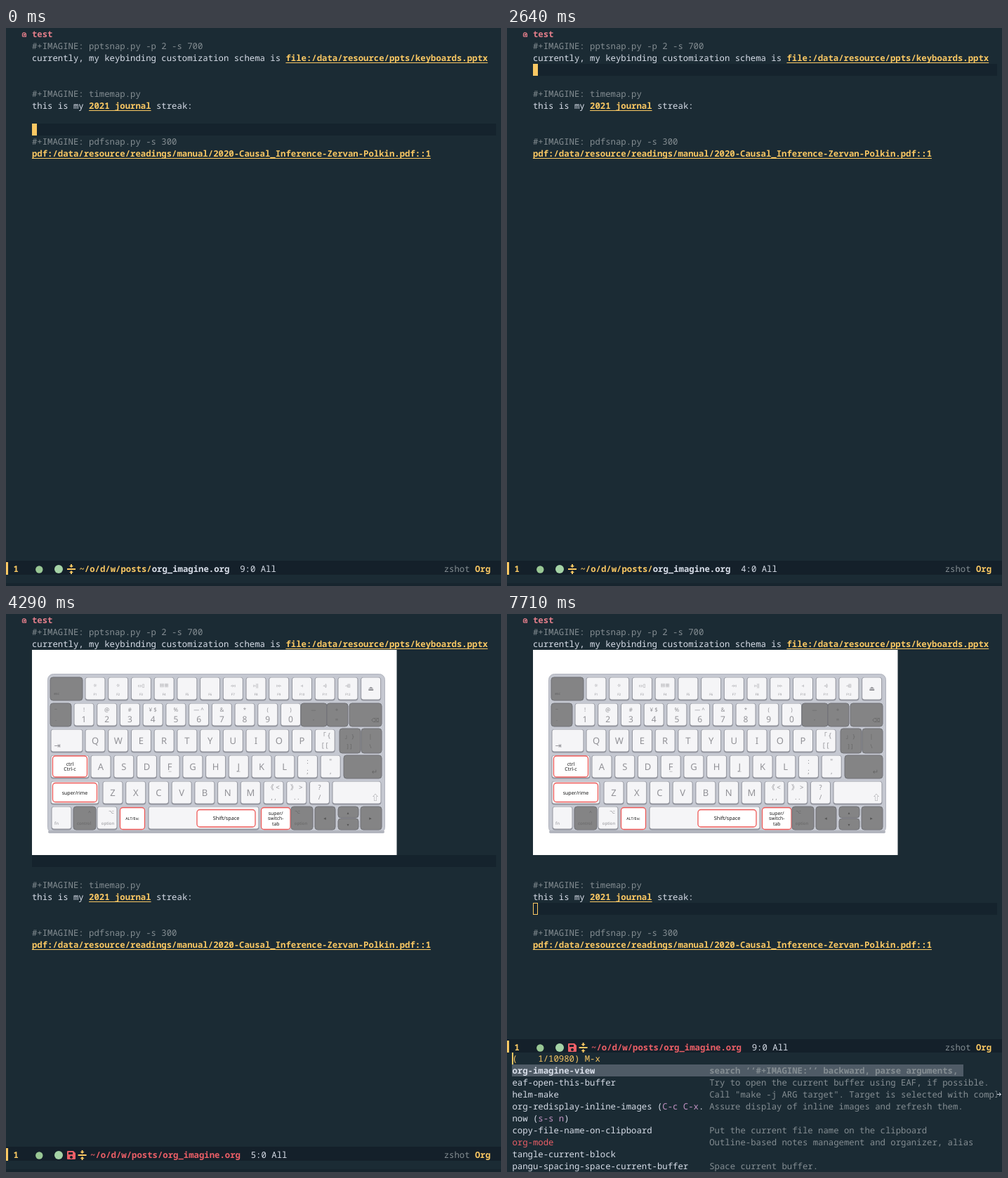
Animation of 705x794 px, one loop 8000 ms. Source, as an HTML page:

```html
<!DOCTYPE html>
<html lang="en">
<head>
<meta charset="utf-8">
<title>Org inline image demo</title>
<style>
  html, body { margin: 0; width: 100%; height: 100%; overflow: hidden; background: #1b2b34; }
  #stage {
    position: relative; width: 705px; height: 794px; overflow: hidden; background: #1b2b34; color: #d8dee9;
    font: 12.313px/17px "Noto Sans Mono", "DejaVu Sans Mono", monospace;
    font-variant-ligatures: none; text-rendering: geometricPrecision;
  }
  #stage > *, #modeline > *, #minibuffer > * { position: absolute; }
  .line, .cell { white-space: pre; height: 17px; }
  .line { left: 36.9px; }
  .current { left: 37px; width: 661px; height: 17px; background: #15232d; }
  .cursor { left: 37px; width: 7px; height: 17px; box-sizing: border-box; color: #1b2b34; white-space: pre; }
  .block { background: #fac863; }
  .hollow { border: 1px solid #fac863; }
  b { font-weight: 700; }
  .dim { color: #848d92; }
  .yellow { color: #fac863; }
  .red { color: #ec5f67; }
  .pink { color: #e27e8a; }
  .violet { color: #c594c5; }
  .link {
    color: #fac863; font-weight: 700; text-decoration: underline 1px;
    text-underline-offset: 1.5px; text-decoration-skip-ink: none;
  }
  #modeline { left: 0; width: 705px; height: 20px; background: #14202a; }
  #modeline .cell { top: 3px; }
  #modeline svg { left: 0; top: 0; }
  #minibuffer { left: 0; top: 624px; width: 705px; height: 170px; background: #1b2b34; }
  #minibuffer .cell { overflow: hidden; }
  .selected { left: 7px; top: 17px; width: 643px; height: 17px; background: #4f5b66; }
  .bar { left: 7px; top: 0; width: 2px; height: 17px; background: #fac863; }
  .arrow { left: 0; top: 0; }
  .bottom { left: 0; top: 790px; width: 705px; height: 4px; background: #17252e; }
  .bullet, .picture { left: 0; top: 0; }
</style>
</head>
<body>
<div id="stage"></div>
<script>
const LOOP = 8000, ROW = 17, CHAR = 7.388;
const PICTURE = { x: 37, y: 51, w: 519.5, h: 292 };

// start time, cursor line, cursor look, picture shown, command list open
const steps = [
  [0, 9, 'block', 0, 0], [1000, 8, 'block', 0, 0], [1150, 7, 'block', 0, 0],
  [1540, 6, 'block', 0, 0], [1730, 5, 'block', 0, 0], [1960, 4, 'block', 0, 0],
  [2350, 5, 'block', 0, 0], [2640, 4, 'block', 0, 0], [2960, 4, 'hollow', 0, 1],
  [4290, 5, '', 1, 0], [6480, 6, 'block', 1, 0], [6650, 7, 'block', 1, 0],
  [6810, 8, 'block', 1, 0], [6970, 9, 'block', 1, 0], [7710, 9, 'hollow', 1, 1]
];

const span = (cls, text) => `<span class="${cls}">${text}</span>`;
const imagine = args => span('dim', '#+IMAGINE: ' + args);

const intro = [
  '<b class="pink">test</b>',
  imagine('pptsnap.py -p 2 -s 700'),
  'currently, my keybinding customization schema is ' + span('link', 'file:/data/resource/ppts/keyboards.pptx')
];
const rest = [
  '', '',
  imagine('timemap.py'),
  `this is my ${span('link', '2021 journal')} streak:`,
  '', '',
  imagine('pdfsnap.py -s 300'),
  span('link', 'pdf:/data/resource/readings/manual/2020-Causal_Inference-Zervan-Polkin.pdf::1')
];

const commands = [
  ['<b>org-imagine-view</b>', '<b>search ‘‘#+IMAGINE:’’ backward, parse arguments,</b>'],
  ['eaf-open-this-buffer', 'Try to open the current buffer using EAF, if possible.'],
  ['helm-make', 'Call "make -j ARG target". Target is selected with compl'],
  [`org-redisplay-inline-images (${span('violet', 'C-c C-x')}.`, 'Assure display of inline images and refresh them.'],
  [`now (${span('violet', 's-s n')})`, ''],
  ['copy-file-name-on-clipboard', 'Put the current file name on the clipboard'],
  [span('red', 'org-mode'), 'Outline-based notes management and organizer, alias'],
  ['tangle-current-block', ''],
  ['pangu-spacing-space-current-buffer', 'Space current buffer.']
];

function cell(x, y, html, cls = '') {
  return `<div class="cell ${cls}" style="left:${x}px;top:${y}px;max-width:${698 - x}px">${html}</div>`;
}

function keyboard() {
  const GREY = '#929297', PITCH = 32.72;
  const rows = [90, 127, 164, 201, 238, 274];
  let out = '';
  const rect = (x, y, w, h, r, attrs) =>
    out += `<rect x="${x}" y="${y}" width="${w}" height="${h}" rx="${r}" ${attrs}/>`;
  const text = (x, y, s, size, fill = GREY) =>
    out += `<text x="${x}" y="${y}" font-size="${size}" fill="${fill}">${s.replace('<', '&lt;')}</text>`;
  const key = (x, right, row, h = 32) => {
    rect(x - .5, rows[row], right - x + 1, h + 1.5, 4, 'fill="#92949d"');
    rect(x + .5, rows[row] + .5, right - x - 1, h - 1, 3, 'fill="#f5f5f7"');
  };
  const dark = (x, right, row, y = rows[row], h = 33) =>
    rect(x, y, right - x, h, 4, 'fill="#848485" stroke="#707176"');
  const special = (x, y, w, h, lines, size) => {
    rect(x, y, w, h, 4, 'fill="#fff" stroke="#ee5a58" stroke-width="1.3"');
    lines.forEach((s, i) =>
      text(x + w / 2, y + h / 2 + size * .36 + (i - (lines.length - 1) / 2) * 7.7, s, size, '#161616'));
  };
  const run = (center, row, labels, draw) => labels.forEach((s, i) => {
    const x = center + i * PITCH;
    key(x - 14, x + 14, row);
    draw(x, s, i);
  });
  const letter = row => (x, s) => {
    if (s.length === 1) return text(x, rows[row] + 20.5, s, 13);
    text(x, rows[row] + 12, s.slice(0, s.length / 2), 9.5);
    text(x, rows[row] + 26, s.slice(s.length / 2), 9.5);
  };

  rect(PICTURE.x, PICTURE.y, PICTURE.w, PICTURE.h, 0, 'fill="#fff"');
  rect(59.5, 85.5, 480, 226, 8, 'fill="#c5c8d1" stroke="#b0b3bd"');
  rect(60, 308, 479, 4, 3, 'fill="#b2b5be"');

  dark(63, 109, 0);
  text(72, 115, 'esc', 5, '#5f5f60');
  run(127, 0, ['☼', '☼', '▭▯', '▦▦', '', '', '◃◃', '▹‖', '▹▹', '◃', '◃)', '◃))', '⏏'], (x, s, i) => {
    text(x, i < 12 ? 104 : 109, s, i < 12 ? 6.5 : 9);
    if (i < 12) text(x, 116, 'F' + (i + 1), 4.5);
  });

  dark(63, 93, 1);
  text(71, 138, '~', 7, '#666');
  text(71, 154, '·', 7, '#666');
  run(111, 1, ['!', '@', '#', '¥ $', '%', '— ^', '&amp;', '*', '(', ')'], (x, s, i) => {
    text(x, 139, s, 8);
    text(x, 154, String((i + 1) % 10), 12);
  });
  dark(420, 457, 1); dark(457, 487, 1); dark(489, 535, 1);
  text(438, 139, '—', 7, '#666'); text(438, 153, '-', 8, '#666');
  text(471, 139, '+', 8, '#666'); text(471, 153, '=', 8, '#666');
  text(526, 154, '⌫', 8, '#666');

  key(64, 109, 2);
  text(73, 191, '⇥', 11);
  run(127, 2, [...'QWERTYUIOP', '「 {[ ['], letter(2));
  dark(475, 505, 2, 163, 35); dark(506, 535, 2, 163, 35);
  text(489, 177, '」 }', 8, '#666'); text(489, 191, '] ]', 8, '#666');
  text(519, 177, '|', 8, '#666'); text(519, 191, '\\', 8, '#666');

  key(64, 118, 3);
  special(66.5, 202, 49, 30, ['ctrl', 'Ctrl-c'], 7);
  run(135, 3, [...'ASDFGHJKL', ':;', '",'], letter(3));
  text(233.5, 223, '_', 9); text(331.5, 223, '_', 9);
  dark(481, 535, 3);
  text(525, 228, '↵', 10, '#666');

  key(64, 132, 4);
  special(66.5, 240.5, 63, 27, ['super/rime'], 7);
  run(152, 4, [...'ZXCVBNM', '《 <, ,', '》 >. .', '?/'], letter(4));
  key(465, 534, 4);
  text(526, 265, '⇧', 11);

  key(65, 93, 5); text(72, 300, 'fn', 6);
  dark(96, 128, 5); text(111, 300, 'control', 6, '#666'); text(119, 285, '^', 7, '#666');
  key(130, 158, 5); text(145, 300, 'option', 6); text(150, 284, '⌥', 7);
  special(162.5, 275.5, 35, 31, ['ALT/Esc'], 5.4);
  key(203, 360, 5);
  special(272, 278.5, 83, 24.5, ['Shift/space'], 7.2);
  special(363.5, 275.5, 41.5, 31, ['super/', 'switch-', 'tab'], 6.8);
  dark(406, 437, 5); text(420, 300, 'option', 6, '#666'); text(415, 284, '⌥', 7, '#666');
  dark(440, 469, 5); text(454, 293, '◂', 7, '#555');
  dark(473, 502, 5, 274, 16); dark(473, 502, 5, 291, 16);
  text(487, 285, '▴', 6, '#555'); text(487, 302, '▾', 6, '#555');
  dark(505, 535, 5); text(519, 293, '▸', 7, '#555');

  return `<svg class="picture" width="705" height="350" text-anchor="middle"
    font-family="Noto Sans, Noto Sans CJK SC, DejaVu Sans, sans-serif">${out}</svg>`;
}

function modeline(line, modified, top) {
  const shift = modified ? 15.6 : 0;
  const color = modified ? 'red' : 'yellow';
  const x = 104.4 + shift;
  const floppy = modified
    ? `<path fill="#ec5f67" fill-rule="evenodd"
        d="M88 6h8l3 3v8q0 1-1 1H88q-1 0-1-1V7q0-1 1-1zm1 2v3h6V8zm4 5a2 2 0 1 0 .01 0z"/>` : '';
  return `<div id="modeline" style="top:${top}px">
    <svg width="705" height="20">
      <rect y="2" width="3" height="18" fill="#fac863"/>
      <circle cx="47.3" cy="12.5" r="5.2" fill="#99c794"/>
      <circle cx="75" cy="12" r="6" fill="#a5d3a6"/>
      ${floppy}
      <path transform="translate(${93 + shift} 12)" fill="#fac863"
        d="M-6-1H6V1H-6zM-1-7H1V-5H3L0-2-3-5H-1zM-1 7H1V5H3L0 2-3 5H-1z"/>
    </svg>`
    + cell(10.4, 3, '<b class="yellow">1</b>')
    + cell(x, 3, `<b class="${color}">~/o/d/w/posts/</b><b class="${modified ? color : ''}">org_imagine.org</b>  ${line}:0 All`)
    + cell(623.7, 3, `${span('dim', 'zshot')} <b class="yellow">Org</b>`)
    + '</div>';
}

function minibuffer() {
  const left = CHAR, docs = left + 38 * CHAR;
  return '<div id="minibuffer"><div class="selected"></div>'
    + cell(left, 0, '(    1/10980) M-x', 'yellow') + '<div class="bar"></div>'
    + commands.map(([name, doc], i) =>
        cell(left, (i + 1) * ROW, name) + cell(docs, (i + 1) * ROW, doc, 'dim')).join('')
    + `<svg class="arrow" width="705" height="170"><path d="M698 59.5h5M701 57l2.5 2.5-2.5 2.5"
        fill="none" stroke="#d8dee9"/></svg></div>`;
}

const bullet = `<svg class="bullet" width="36" height="17" fill="none" stroke="#e27e8a" stroke-width="1.3">
  <path d="M23.5 12V8.5Q24 6.7 26 6.7T28.4 8.7V12.2H23.5M25 9.8L27.4 8.4M25.2 10.2H27"/></svg>`;
const picture = keyboard();

function render([, line, cursor, shown, open]) {
  const lines = shown ? [...intro, '', ...rest] : [...intro, ...rest];
  const topOf = n => (n - 1) * ROW + (shown && n > 4 ? PICTURE.h - ROW : 0);
  const top = topOf(line);
  const under = cursor === 'block' ? lines[line - 1].replace(/<[^>]*>/g, '').charAt(0) : '';
  return `<div class="current" style="top:${top}px"></div>` + bullet
    + lines.map((html, i) => `<div class="line" style="top:${topOf(i + 1)}px">${html}</div>`).join('')
    + (shown ? picture : '')
    + (cursor ? `<div class="cursor ${cursor}" style="top:${top}px">${under}</div>` : '')
    + modeline(line, shown, open ? 604.5 : 757.5)
    + (open ? minibuffer() : '<div class="bottom"></div>');
}

const stage = document.getElementById('stage');
const start = performance.now();
let current = null;

function tick() {
  const time = (performance.now() - start) % LOOP;
  const step = steps.findLast(s => s[0] <= time);
  if (step !== current) {
    current = step;
    stage.innerHTML = render(step);
  }
  requestAnimationFrame(tick);
}
tick();
</script>
</body>
</html>
```
